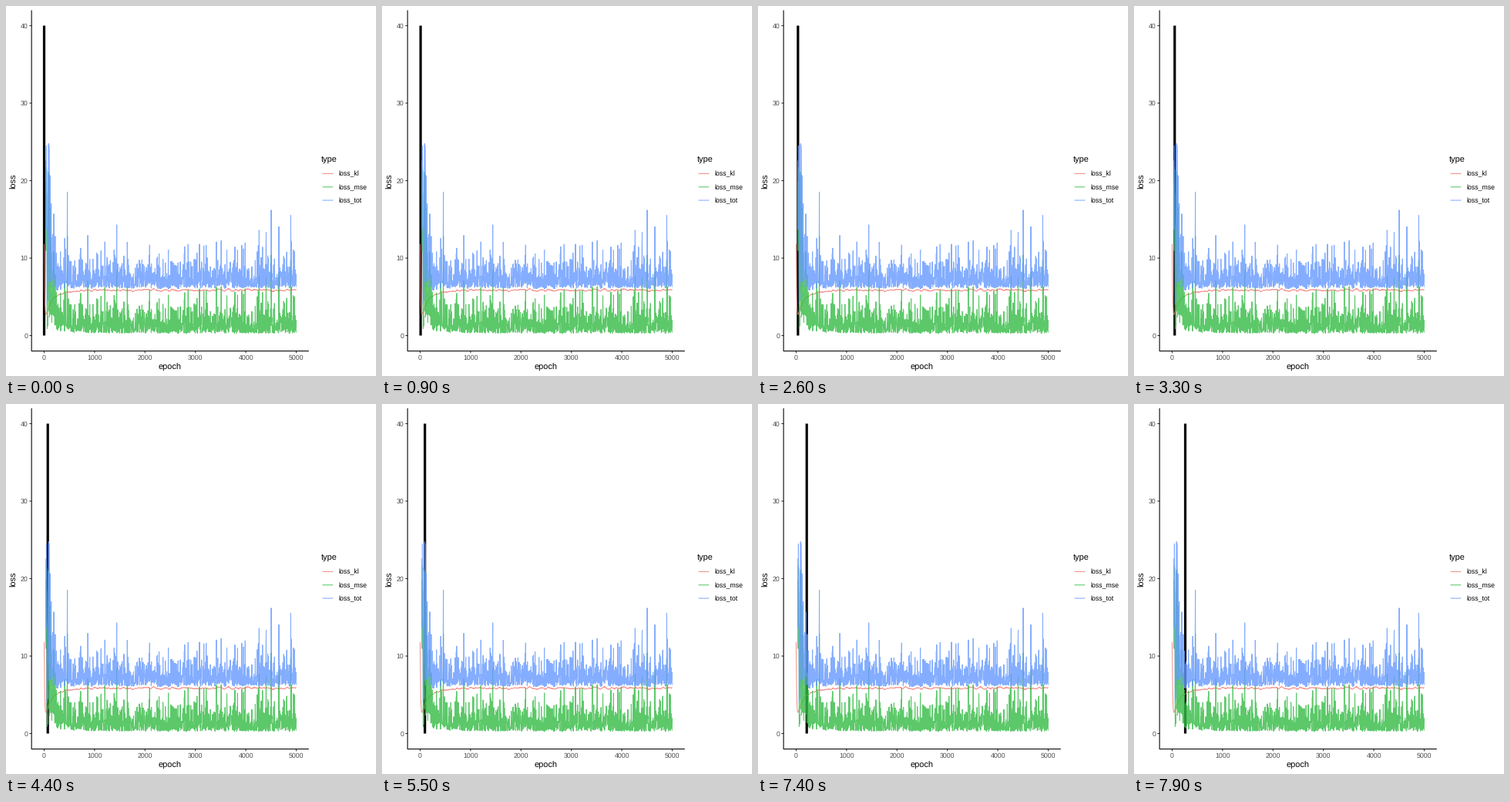
Write a matplotlib script that moves like this. It is 480 px wide and 480 px high and loops after 8000 ms.

```python
import numpy as np
import matplotlib.pyplot as plt
from matplotlib.animation import FuncAnimation

SIZE, DPI = 480, 72
FRAMES, INTERVAL = 80, 100
LEFT, RIGHT, TOP, BOTTOM = 33.15, 392.85, 5.5, 447.6
COLORS = {"loss_kl": "#F07872", "loss_mse": "#33BB44", "loss_tot": "#6699FF"}
ALPHA = 0.8
LINE = 1.07
GREY = "#4D4D4D"

plt.rcParams["font.family"] = "Liberation Sans"
plt.rcParams["text.hinting"] = "none"


def px(epoch):
    return 49.5 + np.asarray(epoch) * 0.0654


def py(loss):
    return 427.5 - np.asarray(loss) * 10.05


def make_losses():
    rng = np.random.default_rng(12)
    epoch = np.arange(0, 5001, 4)
    n = epoch.size

    # KL drops at once, then climbs to a slightly wavy plateau
    drop = 11.8 * np.exp(-epoch / 10)
    climb = 5.85 * (1 - np.exp(-(epoch / 90) ** 0.7))
    wave = np.convolve(rng.normal(size=n + 14), np.ones(15) / 15, "valid")
    kl = drop + climb + 0.3 * wave * np.clip(epoch / 400, 0, 1)

    # MSE: steady spiky noise plus a wide burst that dies away
    burst = 38 * np.exp(-(epoch - 40) / 100) * rng.random(n) ** 1.5
    mse = 0.3 + 1.4 * rng.exponential(size=n) + burst
    mse[epoch < 36] = np.nan
    tot = kl + mse
    tot[tot > 40] = np.nan
    mse[mse > 40] = np.nan
    return epoch, {"loss_kl": kl, "loss_mse": mse, "loss_tot": tot}


fig = plt.figure(figsize=(SIZE / DPI, SIZE / DPI), dpi=DPI, facecolor="white")
ax = fig.add_axes([0, 0, 1, 1])
ax.set(xlim=(0, SIZE), ylim=(SIZE, 0))
ax.axis("off")


def stroke(x, y, color="black", width=LINE, **kw):
    return ax.plot(x, y, color=color, lw=width, solid_capstyle="butt",
                   snap=False, **kw)[0]


def label(x, y, text, size=8.8, color="black", ha="left", va="baseline", **kw):
    ax.text(x, y, text, fontsize=size, color=color, ha=ha, va=va, **kw)


# The marker lies under the translucent curves
marker = stroke([px(0)] * 2, [py(0), py(40)], width=3.2, zorder=1)

epoch, losses = make_losses()
for name, values in losses.items():
    stroke(px(epoch), py(values), COLORS[name], alpha=ALPHA, zorder=2)

# Axes
stroke([LEFT, LEFT, RIGHT], [TOP, BOTTOM, BOTTOM], zorder=4)
for v in range(0, 5001, 1000):
    stroke([px(v)] * 2, [BOTTOM, BOTTOM + 2.75], "#333333")
    label(px(v), 459, str(v), color=GREY, ha="center")
for v in range(0, 41, 10):
    stroke([LEFT - 2.75, LEFT], [py(v)] * 2, "#333333")
    label(28.2, py(v) + 3.2, str(v), color=GREY, ha="right")
label(213, 471.8, "epoch", 11, ha="center")
label(13.4, 227, "loss", 11, ha="center", va="center", rotation=90,
      rotation_mode="anchor") if False else label(
    15, 227, "loss", 11, ha="right", va="center", rotation=90)

# Legend
label(408.7, 202, "type", 11)
for i, (name, color) in enumerate(COLORS.items()):
    y = 217.5 + 17.28 * i
    stroke([410.5, 424.3], [y, y], color, alpha=ALPHA)
    label(431.5, y + 3.2, name)


def update(i):
    # 1, 2, 5, then 10 epochs per frame
    e = np.interp(i, [0, 16, 58, 68, 79], [0, 16, 100, 150, 260])
    marker.set_xdata([px(e)] * 2)
    return (marker,)


anim = FuncAnimation(fig, update, frames=FRAMES, interval=INTERVAL,
                     repeat=True, repeat_delay=0)
plt.show()
```
